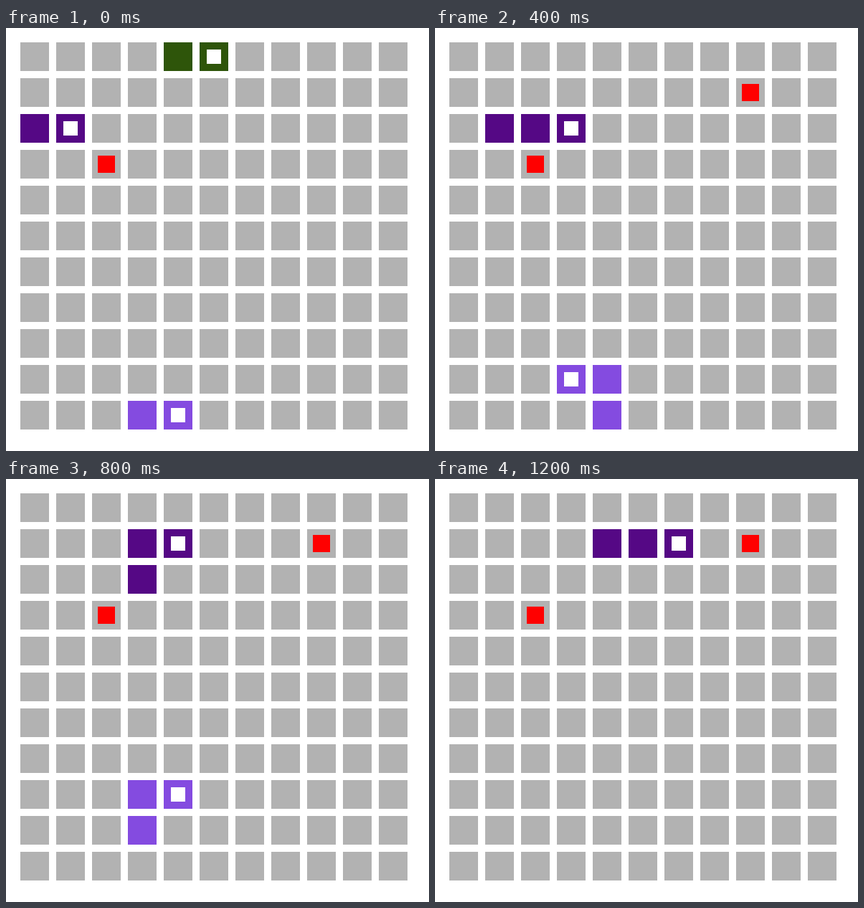
Animation of 590 by 590 pixels, one loop 1400 ms. Source, as an HTML page with a canvas:

```html
<!DOCTYPE html>
<html lang="en">
<head>
<meta charset="utf-8">
<title>Snakes on a grid</title>
<style>
  html, body { margin: 0; width: 100%; height: 100%; overflow: hidden; background: #fff; }
  canvas { display: block; }
</style>
</head>
<body>
<canvas id="board" width="590" height="590"></canvas>
<script>
const ctx = document.getElementById('board').getContext('2d');
const SIZE = 11, PITCH = 50, MARGIN = 20, CELL = 40;
const STEP_MS = 200, STEPS = 7, LENGTH = 3;
const MOVES = { R: [1, 0], L: [-1, 0], U: [0, -1], D: [0, 1] };

// Each snake: tail cell at the start, its moves, and the step at which it dies.
const snakes = [
  { color: '#550885', start: [0, 2], moves: 'RRRURRR', dies: STEPS },
  { color: '#844be0', start: [3, 10], moves: 'RULURR', dies: 6 },
  { color: '#2e550a', start: [4, 0], moves: 'R', dies: 1 }
];
const food = [
  { cell: [2, 3], from: 0 },
  { cell: [8, 1], from: 2 }
];

for (const snake of snakes) {
  snake.path = [snake.start];
  for (const move of snake.moves) {
    const [x, y] = snake.path[snake.path.length - 1];
    const [dx, dy] = MOVES[move];
    snake.path.push([x + dx, y + dy]);
  }
}

// Fills a square centred in the given cell.
function square([col, row], size, color) {
  const inset = MARGIN + (CELL - size) / 2;
  ctx.fillStyle = color;
  ctx.fillRect(col * PITCH + inset, row * PITCH + inset, size, size);
}

function draw(step) {
  ctx.fillStyle = '#fff';
  ctx.fillRect(0, 0, 590, 590);
  for (let row = 0; row < SIZE; row++)
    for (let col = 0; col < SIZE; col++) square([col, row], CELL, '#b2b2b2');

  for (const { cell, from } of food)
    if (step >= from) square(cell, 24, '#f00');

  for (const { color, path, dies } of snakes) {
    if (step >= dies) continue;
    const head = step + 1;
    for (let i = Math.max(0, head - LENGTH + 1); i <= head; i++) square(path[i], CELL, color);
    square(path[head], 20, '#fff');
  }
}

let shown = -1;
const begin = performance.now();
function tick() {
  const elapsed = performance.now() - begin;
  const step = Math.floor(elapsed / STEP_MS) % STEPS;
  if (step !== shown) draw(shown = step);
  requestAnimationFrame(tick);
}
tick();
</script>
</body>
</html>
```
